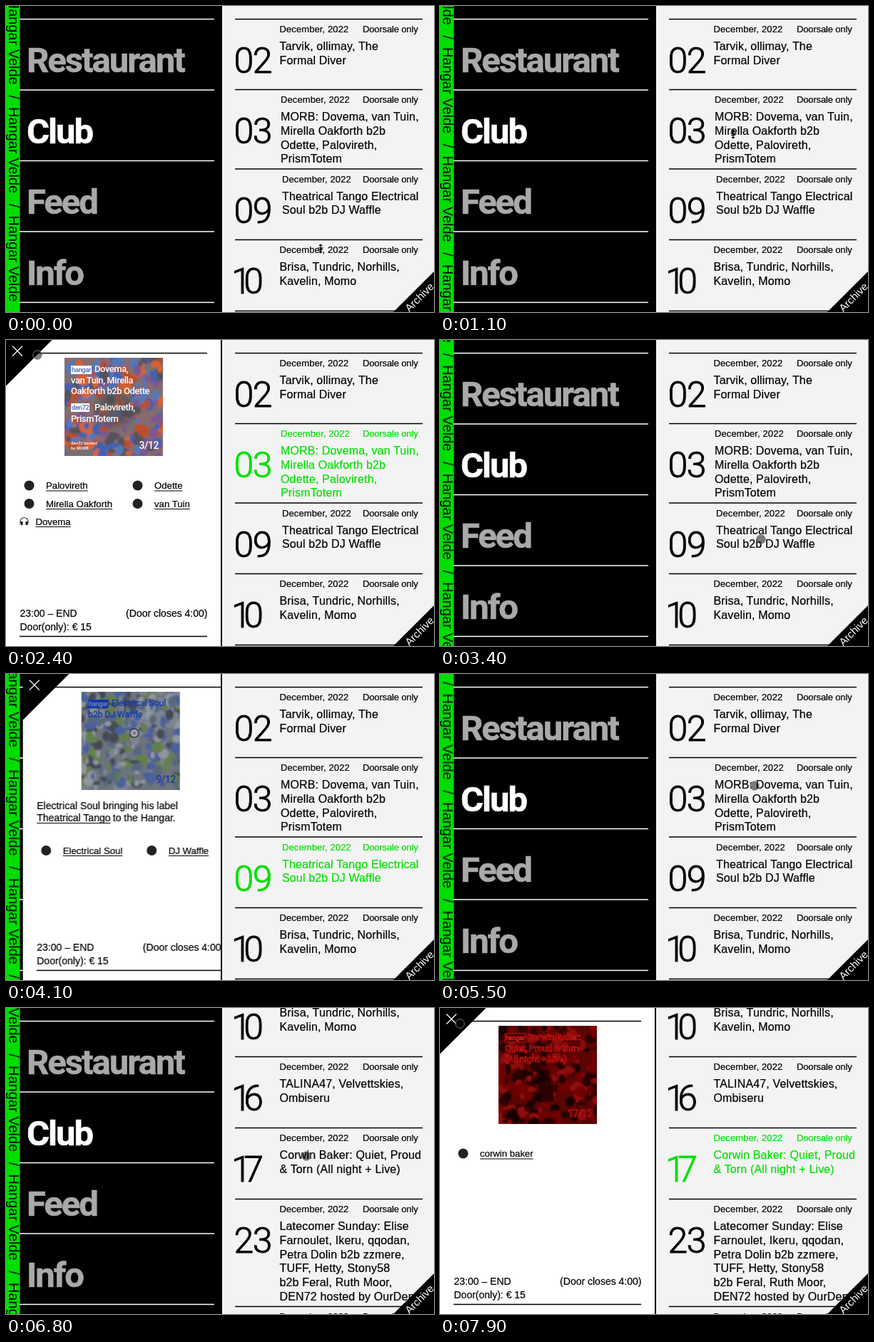
An HTML page that plays this animation: 600x430 px, repeating every 8000 ms.

```html
<!DOCTYPE html>
<html lang="en">
<head>
<meta charset="utf-8">
<title>Club agenda</title>
<style>
html, body { margin: 0; width: 100%; height: 100%; overflow: hidden; background: #000; }
svg { display: block; width: 600px; height: 430px; font-family: "Liberation Sans", Arial, sans-serif; }
text { white-space: pre; }
.menu { font: 700 49px Roboto, sans-serif; letter-spacing: -2px; fill: #a9a9a9; stroke: #a9a9a9; stroke-width: .6px; }
.menu .on { fill: #fff; stroke: #fff; }
.num { font: 300 50px Roboto, sans-serif; letter-spacing: -1.5px; stroke-width: .9px; }
.num.one { letter-spacing: -10.5px; }
.meta { font-size: 13px; }
.title { font-size: 16px; letter-spacing: .15px; }
.body { font-size: 14px; }
.link { font-size: 13.2px; }
.body, .link { stroke: #000; stroke-width: .2px; }
.fly { font: 500 13px Roboto, sans-serif; letter-spacing: -.45px; }
.tiny { font: 500 6px Roboto, sans-serif; }
.strip { font-size: 20px; animation: strip 2s linear infinite; }
@keyframes strip { to { transform: translateY(-152.5px); } }

.panel, .item, #list, #cursor, .mark, .dot { animation-duration: 8s; animation-iteration-count: infinite; }
.panel { transform: translateX(304px); animation-timing-function: cubic-bezier(.455, .03, .515, .955); }
#p1 { animation-name: p1; }
#p2 { animation-name: p2; }
#p3 { animation-name: p3; }
@keyframes p1 {
  0%, 16.25%, 40%, 100% { transform: translateX(304px); }
  23.75%, 32.5% { transform: none; }
}
@keyframes p2 {
  0%, 45.25%, 66.875%, 100% { transform: translateX(304px); }
  52.75%, 59.375% { transform: none; }
}
@keyframes p3 {
  0%, 91.125% { transform: translateX(304px); }
  98.375%, 100% { transform: none; }
}

.item { color: #000; fill: currentColor; stroke: currentColor; stroke-width: .22px; animation-timing-function: step-end; }
#i03 { animation-name: i03; }
#i09 { animation-name: i09; }
#i17 { animation-name: i17; }
@keyframes i03 { 0%, 32.5%, 100% { color: #000; } 16.25% { color: #00e000; } }
@keyframes i09 { 0%, 59.375%, 100% { color: #000; } 45.25% { color: #00e000; } }
@keyframes i17 { 0% { color: #000; } 91.125%, 100% { color: #00e000; } }

#list { animation-name: scroll; animation-timing-function: ease-in-out; }
@keyframes scroll { 0%, 71.25% { transform: none; } 80%, 100% { transform: translateY(-360px); } }

#cursor { animation-name: cursor; animation-timing-function: ease-in-out; }
@keyframes cursor {
  0%, 2.5% { transform: translate(441px, 341px); }
  12.5%, 23.75% { transform: translate(411px, 180px); }
  30% { transform: translate(44px, 21px); }
  31.9%, 33.1% { transform: translate(16px, 15px); }
  42.5%, 53.25% { transform: translate(450px, 280px); }
  58%, 60% { transform: translate(16px, 15px); }
  68.5%, 79% { transform: translate(441px, 157px); }
  84.4%, 91.5% { transform: translate(421px, 208px); }
  98.75%, 100% { transform: translate(28px, 22px); }
}
.mark { animation-name: mark; animation-timing-function: step-end; }
.dot { animation-name: dot; animation-timing-function: step-end; }
@keyframes mark { 0% { opacity: 1; } 15.6%, 100% { opacity: 0; } }
@keyframes dot { 0%, 45.75% { opacity: 0; } 15.6%, 53.25%, 100% { opacity: 1; } }
</style>
</head>
<body>
<svg id="stage" viewBox="0 0 600 430"></svg>
<script>
const range = n => [...Array(n).keys()];
const text = (x, y, str, cls = "", extra = "") =>
  `<text x="${x}" y="${y}" class="${cls}" ${extra}>${str.replace(/&/g, "&amp;")}</text>`;
const rule = (x1, x2, y, color = "#000") =>
  `<path d="M${x1} ${y}H${x2}" stroke="${color}" stroke-width="1.5"/>`;

function random(seed) {
  return () => (seed = seed * 16807 % 2147483647) / 2147483647;
}

// Left menu and running strip
const menu = ["Restaurant", "Club", "Feed", "Info"].map((word, i) =>
  text(29, 93 + i * 99.7, word, word === "Club" ? "on" : "")).join("");
const menuRules = range(5).map(i => rule(19, 292, 18.5 + i * 99.5, "#fff")).join("");
const strip = range(5).map(i => {
  const y = 128 + (i - 1) * 152.5;
  return `<g transform="translate(3.500 ${y}) rotate(90)">
    ${text(0, 0, "/", "", 'text-anchor="middle"')}${text(14, 0, "Hangar Velde")}</g>`;
}).join("");

// Agenda
const agenda = [
  ["02", 18.5, 383.5, ["Tarvik, ollimay, The", "Formal Diver"]],
  ["03", 117.5, 385, ["MORB: Dovema, van Tuin,", "Mirella Oakforth b2b", "Odette, Palovireth,", "PrismTotem"]],
  ["09", 229, 387, ["Theatrical Tango Electrical", "Soul b2b DJ Waffle"]],
  ["10", 328.5, 383.5, ["Brisa, Tundric, Norhills,", "Kavelin, Momo"]],
  ["16", 428.5, 383.5, ["TALINA47, Velvettskies,", "Ombiseru"]],
  ["17", 528.5, 383.5, ["Corwin Baker: Quiet, Proud", "& Torn (All night + Live)"]],
  ["23", 628.5, 383.5, ["Latecomer Sunday: Elise", "Farnoulet, Ikeru, qqodan,", "Petra Dolin b2b zzmere,",
    "TUFF, Hetty, Stony58", "b2b Feral, Ruth Moor,", "DEN72 hosted by OurDen"]],
  ["24", 779.5, 383.5, []]
];
const list = agenda.map(([num, y, x, lines]) => {
  const one = num[0] === "1";
  return rule(321, 584, y) + `<g class="item" id="i${num}">
    ${text(x, y + 18.5, "December, 2022", "meta", 'letter-spacing=".1"')}
    ${text(500, y + 18.5, "Doorsale only", "meta", 'letter-spacing="-.15"')}
    ${text(one ? 316 : 319.5, y + 75.5, num, one ? "num one" : "num")}
    ${lines.map((line, i) => text(x, y + 43.5 + i * 19.8, line, "title")).join("")}</g>`;
}).join("");

// Flyer backgrounds: soft blotches in the given tones
function blotches(seed, base, tones, count, size) {
  const rnd = random(seed);
  const shapes = range(count).map(i => {
    const x = 82 + rnd() * 138, y = 25 + rnd() * 138;
    return `<ellipse cx="${x}" cy="${y}" rx="${size * (.4 + rnd())}" ry="${size * (.4 + rnd())}"
      fill="${tones[i % tones.length]}"/>`;
  }).join("");
  return `<g clip-path="url(#square)"><path d="M82 25h138v138h-138z" fill="${base}"/>
    <g filter="url(#soft)">${shapes}</g>`;
}
const tag = (y, w, word, back, ink) =>
  `<rect x="91" y="${y}" width="${w}" height="12" fill="${back}"/>` +
  text(92, y + 9, word, "fly", `style="font-size:9.5px" fill="${ink}"`);
const flyLines = rows => rows.map(([x, y, str]) => text(x, y, str, "fly")).join("");
const flyDate = str => text(214, 153, str, "fly", 'text-anchor="end" style="font-size:14px"');

const flyer1 = blotches(77, "#8a6a70",
  ["#3f62b4", "#d9622f", "#77706f", "#b8502f", "#7a5a8c", "#55525c", "#5577b8"], 280, 7) +
  `<ellipse cx="152" cy="95" rx="24" ry="28" fill="#4c4b50" opacity=".6" filter="url(#haze)"/>
  <g fill="#fff">${tag(36, 29, "hangar", "#fff", "#4968b0")}${tag(89, 26, "den72", "#fff", "#4968b0")}
  ${flyLines([[124, 45, "Dovema,"], [91, 60.5, "van Tuin, Mirella"], [91, 76, "Oakforth b2b Odette"],
    [124, 99, "Palovireth,"], [91, 114.5, "PrismTotem"]])}
  ${text(91, 146.5, "den72 hosted", "tiny")}${text(91, 153.5, "by MORB", "tiny")}${flyDate("3/12")}</g></g>`;

const flyer2 = blotches(912, "#6d747e",
  ["#4b609c", "#64804a", "#8f969f", "#454b55", "#7b8490", "#59687c"], 320, 6) +
  `<circle cx="156" cy="83" r="6" fill="#a9adb0" stroke="#33373c" stroke-width="1.5"/>
  <circle cx="156" cy="83" r="2.5" fill="#777d82"/>
  <g fill="#1636a4">${tag(36, 29, "hangar", "#1636a4", "#7a8dba")}
  ${flyLines([[124, 45, "Electrical Soul"], [91, 60.5, "b2b DJ Waffle"]])}${flyDate("9/12")}</g></g>`;

const flyer3 = blotches(4411, "#5c0303",
  ["#2a0000", "#8c0808", "#180000", "#6f0505"], 240, 6) +
  `<rect x="138" y="108" width="21" height="24" fill="#190000" opacity=".75"/>
  <g fill="#3a0000" stroke="#f01818" stroke-width=".7">${tag(36, 29, "hangar", "#3a0000", "#3a0000")}
  ${flyLines([[122, 45, "Corwin Baker:"], [91, 60.5, "Quiet, Proud & Torn"], [91, 76, "(All night + Live)"]])}
  ${flyDate("17/12")}</g></g>`;

// Detail panels
const blob = (x, y) => `<circle cx="${x + 13.5}" cy="${y - 4.5}" r="7" fill="#222"/>`;
const link = (x, y, str) => text(x, y, str, "link under");
const entry = (x, y, str) => blob(x, y) + link(x + 37, y, str);
const phones = `<g fill="none" stroke="#222" stroke-width="1.1">
  <path d="M20 258v-3a5.5 5.5 0 0 1 11 0v3"/><path d="M21 255.5h2v4h-2zM28 255.5h2v4h-2z" fill="#222"/></g>`;
const panel = (id, flyer, body) => `<g class="panel" id="${id}">
  <path d="M0 0h302v430H0z" fill="#fff"/>${rule(19, 282, 18.5)}${rule(19, 282, 416.5)}
  ${flyer}${body}
  ${text(19.5, 388.5, "23:00 – END", "body")}
  ${text(282.5, 388.5, "(Door closes 4:00)", "body", 'text-anchor="end"')}
  ${text(19.5, 407.5, "Door(only): € 15", "body")}
  <path d="M0 0h64.500L0 64.500z"/>
  <path d="M9 8.500l14 14M23 8.500l-14 14" stroke="#fff" stroke-width="1.300"/></g>`;

const panels = panel("p1", flyer1,
    entry(19, 209, "Palovireth") + entry(171, 209, "Odette") +
    entry(19, 234.5, "Mirella Oakforth") + entry(171, 234.5, "van Tuin") +
    phones + link(41.5, 259.5, "Dovema")) +
  panel("p2", flyer2,
    text(19.5, 189.5, "Electrical Soul bringing his label", "body") +
    text(19.5, 206.5, "Theatrical Tango", "body under") + text(126, 206.5, "to the Hangar.", "body") +
    entry(19, 252.5, "Electrical Soul") + entry(167, 252.5, "DJ Waffle")) +
  panel("p3", flyer3, entry(19, 209, "corwin baker"));

document.getElementById("stage").innerHTML = `
  <defs>
    <clipPath id="square"><path d="M82 25h138v138h-138z"/></clipPath>
    <filter id="soft"><feGaussianBlur stdDeviation="1"/></filter>
    <filter id="haze"><feGaussianBlur stdDeviation="6"/></filter>
  </defs>
  <path d="M0 0h302v430H0z"/>
  <path d="M0 0h19.500v430H0z" fill="#00de00"/>
  <g class="strip">${strip}</g>
  ${menuRules}<g class="menu">${menu}</g>
  ${panels}
  <path d="M301 0h299v430H301z" fill="#f3f3f3"/>
  <path d="M301 0h2v430h-2z"/>
  <g id="list">${list}</g>
  <path d="M543 430L600 373v57z"/>
  <text transform="translate(565.500 430.500) rotate(-45)" font-size="15" fill="#fff">Archive</text>
  <g id="cursor">
    <path class="mark" d="M0-6V6M-2-4L0-6L2-4M-2 4L0 6L2 4M-4-1H4M-3 1.500H3" fill="none" stroke="#000" stroke-width="1.2"/>
    <circle class="dot" r="6.200" fill="rgba(0,0,0,.5)" stroke="#777" stroke-width="1"/>
  </g>`;

// Underlines follow the measured text
document.querySelectorAll(".under").forEach(node => {
  const x = +node.getAttribute("x"), y = +node.getAttribute("y") + 3;
  node.insertAdjacentHTML("afterend",
    `<path d="M${x} ${y}h${node.getComputedTextLength()}" stroke="#000" stroke-width="1"/>`);
});
</script>
</body>
</html>
```
